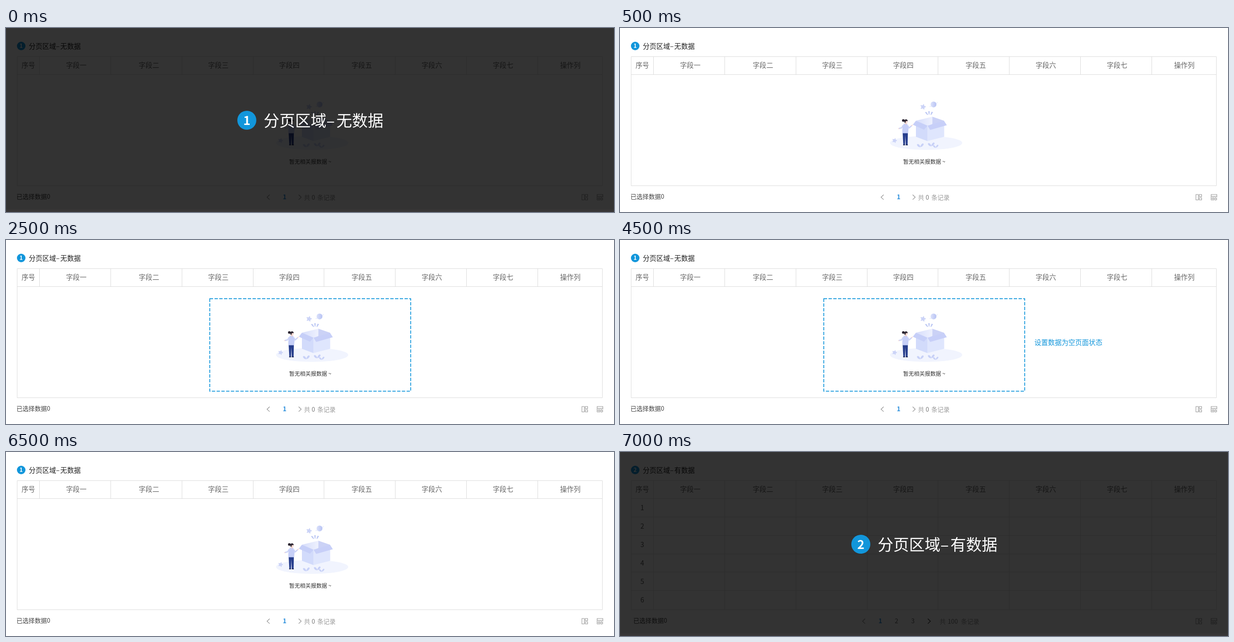
Write an HTML page that moves like this. It is 1280 px wide and 389 px high and loops after 8000 ms.

```html
<!DOCTYPE html>
<html lang="zh-CN">
<head>
<meta charset="utf-8">
<style>
  html, body { margin: 0; width: 100%; height: 100%; overflow: hidden; background: #fff; }
  svg { display: block; width: 100%; height: 100%; }
  text { font-family: "Noto Sans CJK SC", "Noto Sans CJK", "Noto Sans", sans-serif; white-space: pre; }
</style>
</head>
<body>
<svg id="stage" viewBox="0 0 1280 389"></svg>
<script>
const BLUE = '#1296db', GRAY = '#999', LINE = '#dcdcdc', EM = 14.3;

// Text whose glyph box is centred vertically on cy.
const text = (x, cy, size, fill, content, {anchor = 'start', weight = 400} = {}) =>
  `<text x="${x}" y="${(cy + size * .38).toFixed(2)}" font-size="${size}" fill="${fill}" text-anchor="${anchor}" font-weight="${weight}">${content}</text>`;
const middle = (x, cy, size, fill, content, weight = 400) =>
  text(x, cy, size, fill, content, {anchor: 'middle', weight});
const path = (d, fill, extra = '') => `<path d="${d}" fill="${fill}" ${extra}/>`;
const stroke = (d, color, width = 1, extra = '') =>
  path(d, 'none', `stroke="${color}" stroke-width="${width}" ${extra}`);
const group = (id, content) => `<g id="${id}">${content}</g>`;

const badge = (x, y, r, n) =>
  `<circle cx="${x}" cy="${y}" r="${r}" fill="${BLUE}"/>` + middle(x, y, r * 1.28, '#fff', n, 700);

const heading = (x, cy, size, fill, state) =>
  text(x, cy, size, fill, `分页区域–<tspan x="${x + size * 4.64}">${state}</tspan>`, {weight: 500});

const chevron = (x, dir, color) =>
  stroke(`M${x - dir * 2.7} 352.5l${dir * 5.4} 5.2l${-dir * 5.4} 5.2`, color, 1.3);

function table() {
  const columns = [70.5, 220.5, 370.5, 520.5, 669.5, 819.5, 969.5, 1119.5];
  const centers = [47, 148, 301, 447, 596.5, 749, 896.5, 1046.5, 1188];
  const labels = ['序号', ...[...'一二三四五六七'].map(n => '字段' + n), '操作列'];
  return stroke('M23.5 60.5H1255.5V333.5H23.5ZM23.5 98.5H1255.5', LINE) +
    stroke(columns.map(x => `M${x} 60.5V98.5`).join(''), LINE) +
    labels.map((label, i) => middle(centers[i], 79, EM, '#666', label)).join('') +
    group('rows',
      stroke(columns.map(x => `M${x} 98.5V333.5`).join(''), LINE) +
      stroke([137.5, 176.5, 215.5, 253.5, 292.5].map(y => `M23.5 ${y}H1255.5`).join(''), LINE) +
      [1, 2, 3, 4, 5, 6].map(n => middle(47, 79 + 39 * n, 14, '#555', n)).join(''));
}

function icons() {
  return stroke('M1212.5 352H1217.5V363.5H1212.5ZM1219.5 352H1224.5V356.5H1219.5ZM1219.5 359H1224.5V363.5H1219.5Z', GRAY, 1.1) +
    stroke('M1251 363.5H1244.5V352H1256.5V358M1244.5 356H1256.5M1244.5 360H1251M1248.5 356V363.5M1252.5 356V358.5', GRAY, 1.1) +
    `<circle cx="1254" cy="361.5" r="2.2" fill="none" stroke="${GRAY}" stroke-width="1.2"/>`;
}

function star(x, y, r, turn) {
  const points = Array.from({length: 10}, (_, i) => {
    const a = turn + i * Math.PI / 5, d = i % 2 ? r * .48 : r;
    return `${(x + d * Math.sin(a)).toFixed(1)},${(y - d * Math.cos(a)).toFixed(1)}`;
  });
  return `<polygon points="${points.join(' ')}" fill="#cbd3f7" stroke="#cbd3f7" stroke-linejoin="round"/>`;
}

const leaves = (x, y, s = 1) =>
  `<g transform="translate(${x} ${y}) scale(${s})">` +
  path('M0 4Q-5 4-7-1Q-6-4-3-2Q0 0 0 4Q1-2 5-4Q8-4 7-1Q5 3 0 4Z', '#c8d1f7') + '</g>';

function openBox() {
  return path('M623 196L657.5 187.5V203L647 207.5Z', 'url(#inside)') +
    path('M657.5 187.5L682 196V205L647 208L657.5 203Z', '#cbd2f6') +
    path('M623 203L647 208V239L623 230Z', '#d2dbfb') +
    path('M647 208L682.5 203V230L647 239Z', '#dfe6fd') +
    path('M623 196L616.5 204.5L640 215L647.5 206.5Z', '#c6cff8') +
    path('M647.5 206.5L682 196L688 205.5L653 215.5Z', '#c7cff8') +
    path('M642 178L645 177.5L648.5 183L647 184ZM649 176H652L651.3 183H650ZM656 177L659 178L655 184L653.7 183Z', '#b9c5f3');
}

function woman() {
  return path('M595 221H606L605.5 247H601.5L600.8 227L599.8 247H596.5Z', '#263d8c') +
    path('M596 246.5H600V248H596ZM601.5 246.5H606V248H601.5Z', '#20294f') +
    stroke('M596 205.5L593 211L587 212.5', '#ccd4f8', 2.6, 'stroke-linejoin="round"') +
    stroke('M606 206L608.5 211.5L614 206.5', '#ccd4f8', 2.4, 'stroke-linejoin="round"') +
    stroke('M588 212.6L586 212.8M613.5 207L616 204.5', '#f5cfc8', 1.4) +
    path('M597 203Q601 201 605 203L607.5 213L606.5 222.5H594.5Q593.5 211 597 203Z', '#c6cff7') +
    path('M600.5 198H603.5V203.5H600Z', '#f5cfc8') +
    '<ellipse cx="602.7" cy="198.3" rx="2.7" ry="3.3" fill="#f8d7cf"/>' +
    path('M599 200Q597 194 602 193Q606 193.5 605.5 197L602 196.5L600.5 201Z', '#2a2430') +
    '<circle cx="596.5" cy="195.5" r="2.8" fill="#2a2430"/>';
}

function emptyPicture() {
  return '<ellipse cx="644.5" cy="243" rx="76" ry="14.7" fill="#f1f4fe"/>' +
    openBox() + woman() +
    star(638, 166.8, 5.8, .25) + star(578, 238, 5, .3) +
    stroke('M652.5 165.5C649 169 671 159 668 156.5', '#e6eafc', 1.2) +
    '<circle cx="660" cy="161.7" r="6.2" fill="url(#planet)"/>' +
    leaves(632, 248) + leaves(655, 246) + leaves(664.5, 250, .8) +
    text(596, 283, 11.45, '#333', '暂无相关报数据 ~');
}

const records = (x, count, countX, tailX) =>
  text(x, 358, 12.8, GRAY, `共<tspan x="${countX}" fill="#777" font-weight="500">${count}</tspan><tspan x="${tailX}">条记录</tspan>`);

const emptyView = badge(32, 38, 9, 1) + heading(48, 38.5, EM, '#222', '无数据') + emptyPicture() +
  text(22, 356, 12.8, '#444', '已选择数据0') +
  chevron(552.3, -1, GRAY) + middle(586.5, 357.5, 13, '#2a8fdc', 1, 700) + chevron(618.8, 1, GRAY) +
  records(627.5, 0, 643.5, 655.5);

const dataView = badge(32, 38, 9, 2) + heading(48, 38.5, EM, '#222', '有数据') +
  text(28, 356, 12.8, '#444', '已选择数据0') +
  chevron(513.3, -1, GRAY) + middle(548, 357.5, 13, '#2a8fdc', 1, 700) +
  middle(582, 357.5, 13, '#666', 2) + middle(616.5, 357.5, 13, '#666', 3) + chevron(650.8, 1, '#333') +
  records(673, 100, 690, 718);

const cover = (n, state) => badge(507, 195, 20, n) + heading(542.5, 195.5, 33, '#fff', state);

document.getElementById('stage').innerHTML = `
  <defs>
    <linearGradient id="inside"><stop stop-color="#d6ddfb"/><stop offset="1" stop-color="#eef1fe"/></linearGradient>
    <linearGradient id="planet"><stop stop-color="#dce2fb"/><stop offset="1" stop-color="#b7c2f3"/></linearGradient>
  </defs>
  <rect width="1280" height="389" fill="#fff"/>` +
  table() + icons() + group('empty', emptyView) + group('data', dataView) +
  group('frame', `<rect x="429" y="124.2" width="423" height="195.4" fill="none" stroke="${BLUE}" stroke-width="1.7" stroke-dasharray="7 3"/>`) +
  group('note', text(872.5, 216.5, EM, BLUE, '设置数据为空页面状态', {weight: 500})) +
  group('shade', '<rect width="1280" height="389" opacity=".8"/><rect y="383.5" width="1280" height="5.5" fill="#383637"/>') +
  group('coverEmpty', cover(1, '无数据')) + group('coverData', cover(2, '有数据'));

// Visible spans of each part, in ms.
const spans = {
  empty: [[0, 7000]],
  data: [[7000, 8000]],
  rows: [[7000, 8000]],
  frame: [[2500, 4000], [4500, 6500]],
  note: [[3000, 4000], [4500, 6500]],
  shade: [[0, 500], [7000, 8000]],
  coverEmpty: [[0, 500]],
  coverData: [[7000, 8000]],
};

function render() {
  const t = performance.now() % 8000;
  for (const [id, list] of Object.entries(spans)) {
    const on = list.some(([from, to]) => t >= from && t < to);
    document.getElementById(id).style.display = on ? '' : 'none';
  }
  requestAnimationFrame(render);
}
render();
</script>
</body>
</html>
```
